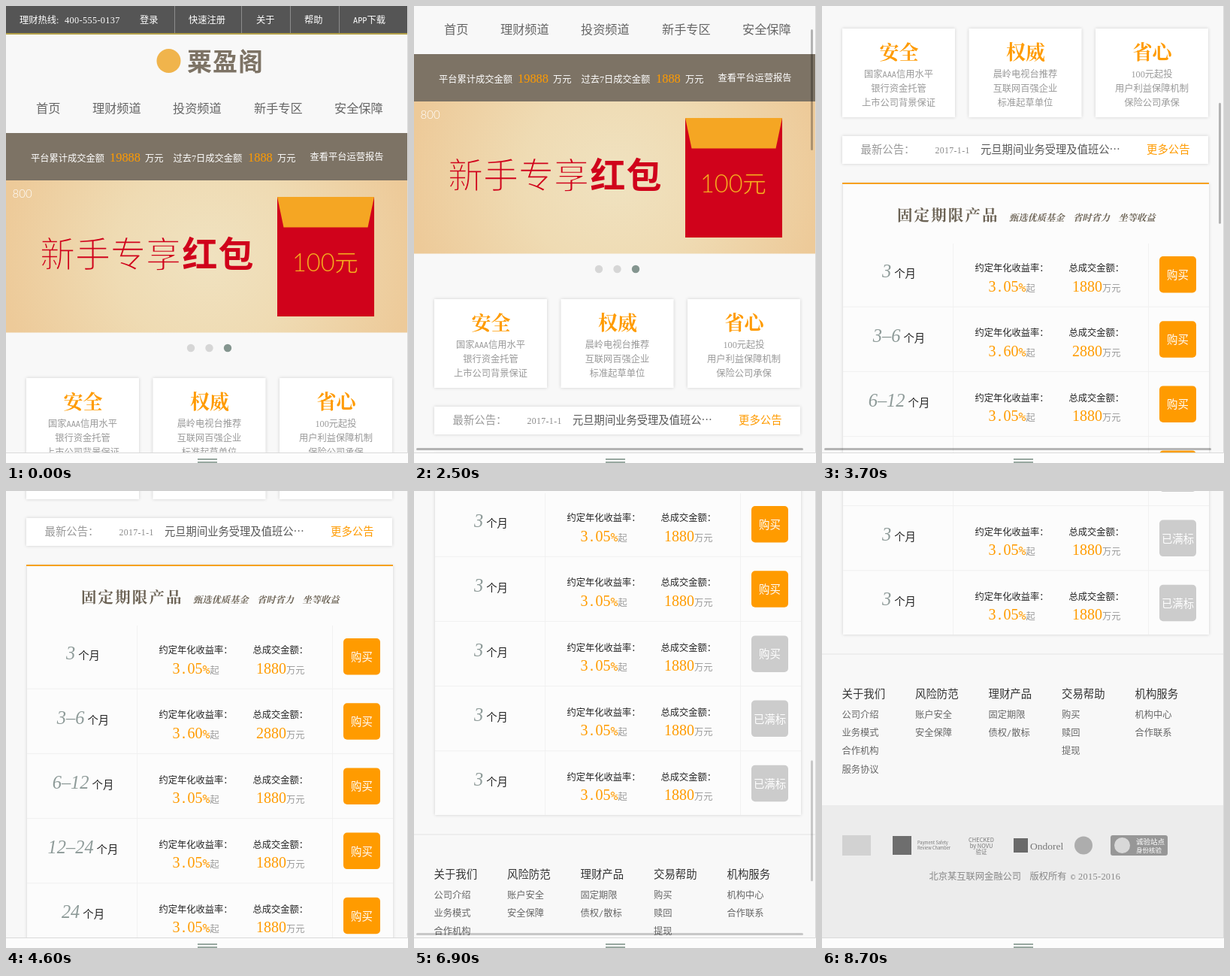
Write an HTML page that moves like this. It is 535 px wide and 608 px high and loops after 9.4 s.

```html
<!DOCTYPE html>
<html lang="zh-CN">
<head>
<meta charset="utf-8">
<title>理财首页</title>
<style>
html, body { margin: 0; width: 100%; height: 100%; overflow: hidden; background: #fcfcfc; }
svg { display: block; }
text { font-family: "Liberation Serif", "Noto Sans CJK SC", "Noto Sans CJK", serif; white-space: pre; }
.half { font-family: "DejaVu Sans Mono", monospace; font-size: .833em; }
.sans { font-family: "Noto Sans CJK SC", "Noto Sans CJK", sans-serif; }
.light { font-family: Lato, "Noto Sans CJK SC", "Noto Sans CJK", sans-serif; font-weight: 300; }
/* an outline in the backdrop colour slims the strokes */
.slim { stroke: url(#glow); stroke-width: 1.6; }
.slim-red { stroke: #d0021b; stroke-width: .8; }
.title { font-family: "Noto Serif CJK SC", "Noto Sans CJK SC", "Noto Sans CJK", serif; font-weight: 700; }
.brand { font-weight: 700; letter-spacing: 1px; }
.product { letter-spacing: 2.1px; }
.slogan { font-style: italic; }
.term { font-style: italic; font-size: 24.4px; fill: #8d9a98; }
.num { letter-spacing: .37px; }
.mid { text-anchor: middle; }
.card { filter: drop-shadow(0 0 2px rgba(0, 0, 0, .16)); }
</style>
</head>
<body>
<svg width="100%" height="100%" viewBox="0 0 535 608">
  <defs>
    <radialGradient id="glow" gradientUnits="userSpaceOnUse" cx="268" cy="333" r="275">
      <stop offset="0" stop-color="#f0e2c0"/>
      <stop offset=".45" stop-color="#efdbb3"/>
      <stop offset="1" stop-color="#edca99"/>
    </radialGradient>
  </defs>
  <svg width="535" height="595">
    <rect width="535" height="595" fill="#f8f8f8"/>
    <g id="page"></g>
    <g id="bars" fill="#000" fill-opacity=".28">
      <rect x="3" y="588" width="515" height="3" rx="1.5"/>
      <rect id="thumb" x="528" width="3" height="161" rx="1.5"/>
    </g>
  </svg>
  <path d="M0 594.5H534.5V0" fill="none" stroke="#dadada"/>
  <path d="M255 603H281M255 607H281" stroke="#98a8a0" stroke-width="2"/>
</svg>
<script>
const ORANGE = '#ff9b00', RED = '#d0021b', BROWN = '#7d7365';
const SMALL = 12.25, MEDIUM = 14.4;
const out = [];

// capitals and signs take half a character, as the digits do
const half = s => s.replace(/[A-Z.%©/]+/g, m => `<tspan class="half">${m}</tspan>`);

function rect(x, y, w, h, fill, rx = 0, cls = '') {
  out.push(`<rect x="${x}" y="${y}" width="${w}" height="${h}" fill="${fill}" rx="${rx}" class="${cls}"/>`);
}
function circle(x, y, r, fill) {
  out.push(`<circle cx="${x}" cy="${y}" r="${r}" fill="${fill}"/>`);
}
function line(d, stroke, width = 1) {
  out.push(`<path d="${d}" stroke="${stroke}" stroke-width="${width}" fill="none"/>`);
}
function raw(x, base, markup, size, fill, cls = '') {
  out.push(`<text x="${x}" y="${base}" font-size="${size}" fill="${fill}" class="${cls}">${markup}</text>`);
}
// y is the vertical middle of the characters
function text(x, y, s, size, fill, cls) {
  raw(x, y + size * .38, half(s), size, fill, cls);
}

function header() {
  rect(0, 0, 535, 36, '#555');
  rect(0, 36, 535, 2, '#b5a24a');
  for (const x of [224.5, 313.5, 378.5, 443.5]) line(`M${x} 0V36`, '#8c8c8c');
  text(18, 18, '理财热线:', SMALL, '#fff');
  text(78, 18, '400-555-0137', SMALL, '#fff', 'num');
  [[178, '登录'], [243, '快速注册'], [333, '关于'], [397, '帮助'], [462, 'APP下载']]
    .forEach(([x, s]) => text(x, 18, s, SMALL, '#fff'));
  circle(216.5, 73, 16, '#f0b44c');
  text(241, 73, '粟盈阁', 33, BROWN, 'sans brand');
  [[40, '首页'], [115, '理财频道'], [222, '投资频道'], [330, '新手专区'], [437, '安全保障']]
    .forEach(([x, s]) => text(x, 136, s, 16.2, '#666'));
}

function stats() {
  rect(0, 169, 535, 63, BROWN);
  [[33, '平台累计成交金额'], [185, '万元'], [222.5, '过去7日成交金额'], [361, '万元']]
    .forEach(([x, s]) => text(x, 202, s, SMALL, '#fff'));
  text(404.5, 200, '查看平台运营报告', SMALL, '#fff');
  text(138, 200.5, '19888', 16.4, ORANGE);
  text(322, 200.5, '1888', 16.4, ORANGE);
}

function banner() {
  rect(0, 232, 535, 202.5, 'url(#glow)');
  text(8.5, 249, '800', 15, '#fff', 'light');
  text(45, 329, '新手专享', 47, RED, 'sans slim');
  text(234.5, 329, '红包', 47, RED, 'sans brand');
  rect(361, 254, 129, 159, RED);
  out.push('<path d="M361 254H490L481.5 294.5H369.5Z" fill="#f5a623"/>');
  text(381, 341, '100', 32.5, '#f5b01f', 'light');
  text(437, 341, '元', 32, '#f5b01f', 'sans slim-red');
  [246, 270.5, 295].forEach((x, i) => circle(x, 455, 5.2, i < 2 ? '#d6d6d6' : '#84958f'));
}

function cards() {
  [
    ['安全', '国家AAA信用水平', '银行资金托管', '上市公司背景保证'],
    ['权威', '晨岭电视台推荐', '互联网百强企业', '标准起草单位'],
    ['省心', '100元起投', '用户利益保障机制', '保险公司承保'],
  ].forEach(([head, ...lines], i) => {
    const x = 27 + i * 168.5;
    rect(x, 495, 150, 118, '#fff', 0, 'card');
    text(x + 75.5, 526, head, 26, ORANGE, 'title mid');
    lines.forEach((s, k) => text(x + 75, 555.3 + k * 18.8, s, SMALL, '#999', 'mid'));
  });
}

function notice() {
  rect(27, 638, 487, 37, '#fff', 0, 'card');
  text(51.5, 656, '最新公告：', MEDIUM, '#999');
  text(150.5, 657, '2017-1-1', 11.8, '#888', 'num');
  text(211, 656, '元旦期间业务受理及值班公⋯', 14.3, '#555');
  text(432, 656, '更多公告', MEDIUM, ORANGE);
}

function product(top, rows) {
  rect(28, top, 487, 508, '#fcfcfc', 0, 'card');
  rect(27, top - 1, 488, 2, '#f6a11f');
  text(100, top + 42, '固定期限产品', 20.5, '#6b6254', 'title product');
  [[249, '甄选优质基金'], [334, '省时省力'], [394.5, '坐等收益']]
    .forEach(([x, s]) => text(x, top + 45.5, s, SMALL, '#6b6254', 'title slogan'));
  line(`M174.5 ${top + 80}V${top + 508}M434.5 ${top + 80}V${top + 508}`, '#f2f2f2');
  const unit = s => `<tspan font-size="${SMALL}" fill="#999">${s}</tspan>`;
  rows.forEach(([term, rate, sum, label, live], i) => {
    const y = top + i * 86.2;
    if (i) line(`M28 ${y + 78}H515`, '#f0f0f0');
    raw(102.5, y + 124.5, `<tspan class="term">${term}</tspan><tspan dx="4">个月</tspan>`, MEDIUM, '#222', 'mid');
    text(203.5, y + 112.5, '约定年化收益率：', SMALL, '#222');
    text(328.5, y + 112.5, '总成交金额：', SMALL, '#222');
    raw(221.5, y + 143.5, half(rate + '%') + unit('起'), 20, ORANGE);
    raw(333, y + 143.5, sum + unit('万元'), 20, ORANGE);
    rect(449, y + 97, 49, 48.5, live ? ORANGE : '#ccc', 5);
    text(473.5, y + 121.5, label, MEDIUM, '#fff', 'mid');
  });
}

function footer() {
  rect(0, 1766, 535, 2, '#eee');
  [
    ['关于我们', '公司介绍', '业务模式', '合作机构', '服务协议'],
    ['风险防范', '账户安全', '安全保障'],
    ['理财产品', '固定期限', '债权/散标'],
    ['交易帮助', '购买', '赎回', '提现'],
    ['机构服务', '机构中心', '合作联系'],
  ].forEach(([head, ...links], i) => {
    const x = 26.5 + i * 97.5;
    text(x, 1819.5, head, MEDIUM, '#333');
    links.forEach((s, k) => text(x, 1847.2 + k * 24.3, s, SMALL, '#666'));
  });
  rect(0, 1968, 535, 177, '#ececec');
  badges(2008);
  text(142.5, 2062, '北京某互联网金融公司', SMALL, '#888');
  text(276.5, 2062, '版权所有', SMALL, '#888');
  text(331, 2062, '© 2015-2016', SMALL, '#888', 'num');
}

function badges(y) {
  rect(27, y, 38, 27, '#d2d2d2');
  rect(94, y + 1, 25, 25, '#6e6e6e');
  raw(127, y + 12, 'Payment Safety', 5.6, '#777', 'sans');
  raw(127, y + 19, 'Review Chamber', 5.6, '#777', 'sans');
  ['CHECKED', 'by NOVU', '验证'].forEach((s, i) =>
    raw(212, y + 9 + i * 8, s, 7.5, '#777', 'sans mid'));
  rect(255, y + 4, 19, 19, '#6a6a6a');
  raw(277, y + 19, 'Ondorel', 13.5, '#777');
  circle(348, y + 13.5, 12, '#adadad');
  rect(384, y, 76, 27, '#979797', 3);
  circle(399.5, y + 13.5, 10.5, '#d8d8d8');
  text(418, y + 8.5, '诚验站点', 9.5, '#fff', 'sans');
  text(418, y + 19.5, '身份核验', 8.5, '#fff', 'sans');
}

header();
stats();
banner();
cards();
notice();
product(701, [
  ['3', '3.05', 1880, '购买', true],
  ['3–6', '3.60', 2880, '购买', true],
  ['6–12', '3.05', 1880, '购买', true],
  ['12–24', '3.05', 1880, '购买', true],
  ['24', '3.05', 1880, '购买', true],
]);
product(1233, ['购买', '购买', '购买', '已满标', '已满标']
  .map((label, i) => ['3', '3.05', 1880, label, i < 2]));
footer();

const $ = id => document.getElementById(id);
$('page').innerHTML = out.join('');

// Each burst: start time, then one value per 100 ms; the last one holds.
const LOOP = 9400, STEP = 100;
const scroll = [
  [0, 0],
  [1800, 13, 70, 101],
  [2500, 105, 122, 152, 185, 201],
  [3400, 211, 253, 325, 465, 570, 602],
  [5100, 626, 716, 862, 1008],
  [6000, 1019, 1075, 1185, 1282, 1310],
  [7300, 1332, 1425, 1526, 1550],
];
const fade = [
  [0, 0],
  [1800, 1],
  [4400, .7, .35, 0],
  [5100, 1],
  [6900, .7, .35, 0],
  [7300, 1],
  [8100, .5, 0],
];

function valueAt(track, t) {
  const [start, ...values] = track.filter(b => b[0] <= t).pop();
  return values[Math.min(values.length - 1, Math.floor((t - start) / STEP))];
}

function draw() {
  const t = performance.now() % LOOP;
  const y = valueAt(scroll, t);
  $('page').setAttribute('transform', `translate(0 ${-y})`);
  $('thumb').setAttribute('y', 2.5 + y * .2715);
  $('bars').setAttribute('opacity', valueAt(fade, t));
  requestAnimationFrame(draw);
}
draw();
</script>
</body>
</html>
```
